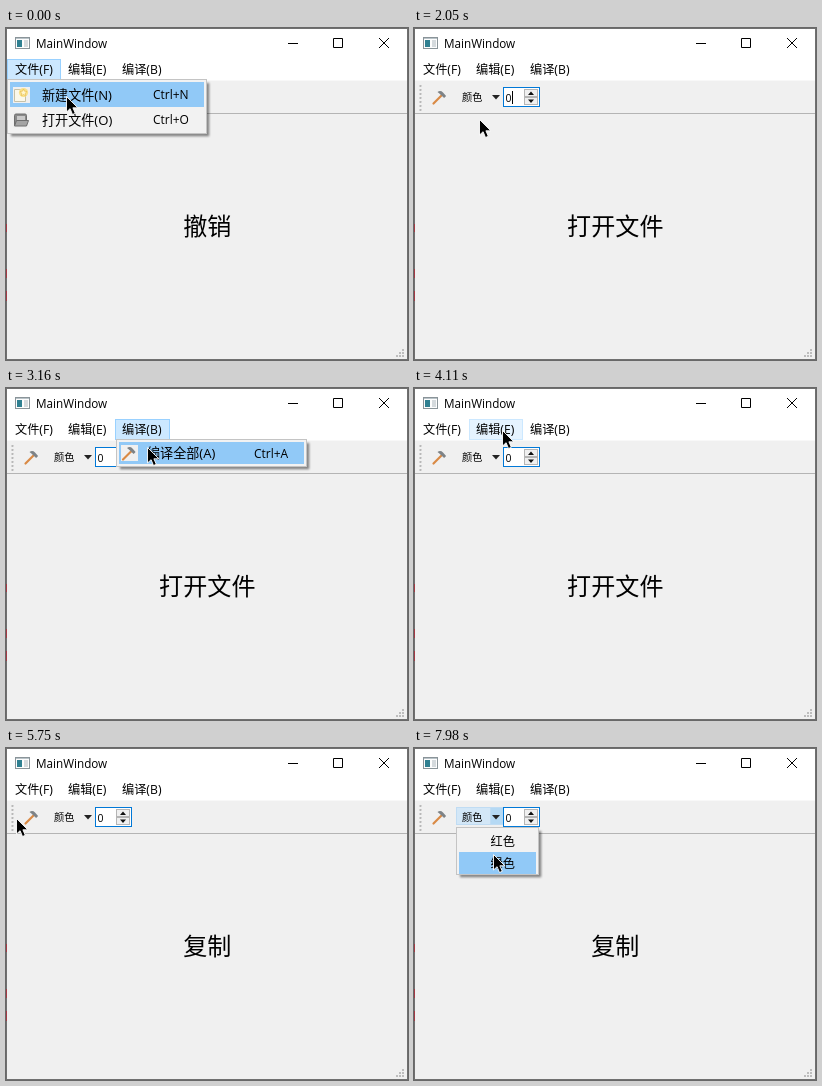
An HTML page that plays this animation: 402 px wide and 332 px high, repeating every 8 s.

```html
<!DOCTYPE html>
<html lang="zh-CN">
<head>
<meta charset="utf-8">
<title>MainWindow</title>
<style>
  html, body { margin: 0; width: 100%; height: 100%; overflow: hidden; background: #f0f0f0; }
  svg { display: block; width: 100vw; height: 100vh; }
  text { font-family: "Open Sans", "Noto Sans CJK SC", "Noto Sans CJK", sans-serif; fill: #000; white-space: pre; }
</style>
</head>
<body>
<svg id="stage" viewBox="0 0 402 332">
  <defs>
    <filter id="soft" x="-20%" y="-20%" width="140%" height="140%"><feGaussianBlur stdDeviation="1.1"/></filter>
    <g id="hammer">
      <path d="M2 14.5L10 6.5" stroke="#d98a45" stroke-width="2.2" stroke-linecap="round"/>
      <path d="M6 3Q9 1 11.500 3.500L14.600 7 12.600 9 9.500 6Q8 4.400 6 3z" fill="#7d8387"/>
    </g>
    <g id="new">
      <path d="M1.500 2.500h11v12h-11z" fill="#fbf8ea" stroke="#c6c1a8"/>
      <circle cx="10.500" cy="5.500" r="4.600" fill="#f8e08a"/>
      <path d="M10.500 2l1 2.200 2.500.3-1.800 1.700.5 2.500-2.200-1.200-2.200 1.200.5-2.500L7 4.500l2.500-.3z" fill="#fff6cf" stroke="#e8b944" stroke-width=".6"/>
    </g>
    <g id="open">
      <path d="M1.500 3.500q0-1.500 1.500-1.500h9q1.500 0 1.500 1.500v10h-12z" fill="#8a8a8a" stroke="#6e6e6e"/>
      <path d="M4 4h8v5H4z" fill="#c9c9c9"/>
      <path d="M3.500 8.500h12l-2 5.500h-12z" fill="#a4a4a4" stroke="#6e6e6e"/>
    </g>
    <g id="undo" fill="none" stroke="#858585" stroke-width="1.1">
      <path d="M6.500 3.500L4.500 5.500l2 2M4.500 5.500h5a2.700 2.700 0 0 1 0 5.400H6"/>
    </g>
    <g id="copy" fill="#f6f6f6" stroke="#6a6a6a" stroke-width=".9">
      <path d="M7 3.500h3.500l2 2v5H7z"/><path d="M4 5.500h3.500l2 2v5H4z"/>
    </g>
    <g id="paste" fill="#f2f2f2" stroke="#7a7a7a" stroke-width=".9">
      <path d="M4 4.500h6v7H4z"/><path d="M5.500 3.500h3v1.500h-3z"/><path d="M7.500 7.500h3l2 2v3h-5z"/>
    </g>
  </defs>
</svg>
<script>
const LOOP = 8000;
const svg = document.getElementById('stage');

function el(tag, attrs, parent = svg, text) {
  const node = document.createElementNS('http://www.w3.org/2000/svg', tag);
  for (const k in attrs) node.setAttribute(k, attrs[k]);
  if (text !== undefined) node.textContent = text;
  parent.appendChild(node);
  return node;
}
const rect = (x, y, width, height, fill, parent) => el('rect', { x, y, width, height, fill }, parent);
const box = (x, y, w, h, fill, stroke, parent) =>
  el('rect', { x: x + .5, y: y + .5, width: w - 1, height: h - 1, fill, stroke }, parent);
const path = (d, attrs, parent) => el('path', { d, fill: 'none', ...attrs }, parent);
const label = (s, x, y, size, parent) => el('text', { x, y, 'font-size': size }, parent, s);
const show = (node, on) => node.setAttribute('visibility', on ? 'visible' : 'hidden');

// Window frame
rect(0, 0, 402, 332, '#f0f0f0');
rect(0, 0, 402, 52, '#fff');
rect(1, 52, 400, 1, '#f8f8f8');
rect(1, 85, 400, 1, '#b4b4b4');
box(0, 0, 402, 332, 'none', '#707070');
for (const [y, h] of [[196, 8], [241, 9], [263, 10]]) rect(0, y, 1, h, '#a33a45');

// Title bar
box(9, 9, 15, 12, '#fdfdfd', '#8a9499');
rect(10, 10, 13, 1, '#b9c3c8');
rect(11, 12, 5, 7, '#2f8091');
rect(18, 12, 4, 7, '#d5dadd');
label('MainWindow', 30, 20, 11.7);
path('M282 15.5h10M327.500 10.500h9v9h-9zM373 10l10 10M383 10l-10 10', { stroke: '#000' });

// Menu bar
const bars = [['文件(F)', 1, 54, 9], ['编辑(E)', 55, 54, 62], ['编译(B)', 109, 55, 116]].map(([s, x, w, tx]) => {
  const hot = box(x, 31, w, 21, '#e5f3ff', '#cce8ff');
  label(s, tx, 46, 12.2);
  return { x, w, hot };
});

// Tool bar
for (let y = 57; y < 83; y += 4) { rect(7, y + 1, 1, 1, '#fff'); rect(5.500, y, 2, 2, '#b8b8b8'); }
const hammerHot = box(11, 54, 28, 30, '#d8eaf9', '#c0dcf3');
el('use', { href: '#hammer', x: 17.500, y: 61 });
const colorHot = el('g', {});
box(42, 59, 35, 18, '#d3e7f7', '#c0dcf3', colorHot);
const arrowHot = box(76, 59, 14, 18, '#d3e7f7', '#c0dcf3', colorHot);
label('颜色', 48, 73, 10.2);
path('M78 67h8l-4 4.500z', { fill: '#222' });

// Spin box
box(89, 59, 37, 20, '#fff', '#0078d7');
for (const y of [61, 69]) box(110, y, 14, 8, '#f0f0f0', '#b5b5b5');
path('M114 67l3-3.500 3 3.500zM114 71.500h6l-3 3.500z', { fill: '#111' });
label('0', 91.500, 73.500, 10.5);
const caret = rect(98, 63, 1, 13, '#000');

// Size grip
for (let r = 0; r < 3; r++)
  for (let c = 0; c <= r; c++) rect(396 - 3 * c, 321 + 3 * r, 2, 2, '#bdbdbd');

const message = el('text', { x: 201.300, y: 207, 'font-size': 24.1, 'text-anchor': 'middle' });

// L-shaped shadow, so that nothing dark shows through a fading menu
function shadow(x, y, w, h, parent) {
  const [r, b] = [x + w, y + h];
  path(`M${x + 4} ${b - 1.5}H${r - 1.5}V${y + 4}H${r + 2.2}V${b + 2.2}H${x + 4}z`,
    { fill: '#000', opacity: .46, filter: 'url(#soft)' }, parent);
}

// Popup menus; spans are [open, close], fade from the opening time
function popup({ x, y, w, h, row, first, icons, keys, tx, kx, ix, items, spans, bar, size = 13.1 }) {
  const g = el('g', {});
  shadow(x, y, w, h, g);
  const body = el('g', {}, g);
  box(x, y, w, h, '#f2f2f2', '#c4c4c4', body);
  const rows = items.map((s, i) => {
    const top = first + row * i, mid = top + row / 2;
    const hot = rect(x + 3, top, w - 6, row, '#91c9f7', body);
    if (icons) {
      const iy = Math.floor(mid - 7.5);
      rect(ix, iy, 17, 16, '#f0f0f0', body);
      el('use', { href: '#' + icons[i], x: ix, y: iy }, body);
    }
    label(s, tx, mid + 5.300, size, body);
    if (keys) label('Ctrl+' + keys[i], kx, mid + 4.500, 12, body);
    return { top, hot };
  });
  return { g, body, rows, x, w, row, spans, bar };
}
const popups = [
  popup({ x: 1, y: 51, w: 200, h: 55, row: 25, first: 54, icons: ['new', 'open'], keys: 'NO',
    tx: 36, kx: 147, ix: 7, items: ['新建文件(N)', '打开文件(O)'], spans: [[-500, 240], [1190, 1680]], bar: 0 }),
  popup({ x: 55, y: 51, w: 170, h: 80, row: 25, first: 54, icons: ['undo', 'copy', 'paste'], keys: 'ZCV',
    tx: 90, kx: 172, ix: 60, items: ['撤销(Z)', '复制', '粘贴'], spans: [[4170, 4780]], bar: 1 }),
  popup({ x: 110, y: 51, w: 191, h: 28, row: 22, first: 54, icons: ['hammer'], keys: 'A',
    tx: 141, kx: 248, ix: 115, items: ['编译全部(A)'], spans: [[2960, 3430]], bar: 2 }),
  popup({ x: 42, y: 79, w: 83, h: 48, row: 22, first: 82,
    tx: 76.500, items: ['红色', '绿色'], spans: [[7620, LOOP + 1]], bar: -1, size: 12.2 })
];

const cursor = path('M0 0V15.500L3.600 12.200 6 18 8.800 16.800 6.400 11.300H11.300z',
  { fill: '#000', stroke: '#fff', 'stroke-width': .9 });

// Pointer stops: time, x, y
const stops = [
  [0, 60, 68], [790, 60, 68], [1110, 43, 42], [1240, 43, 42], [1310, 43, 51], [1570, 67, 90],
  [1900, 67, 90], [2050, 65, 91], [2300, 66, 72], [2690, 86, 41], [2720, 88, 40], [2860, 118, 28],
  [2960, 128, 39], [3160, 141, 59], [3300, 146, 66], [3770, 146, 66], [4060, 89, 42], [4200, 86, 42],
  [4430, 100, 78], [4570, 106, 85], [4660, 107, 86], [4780, 107, 86], [5100, 70, 80], [5400, 18, 68],
  [5600, 6, 70], [5930, 14, 71], [6130, 14, 71], [6500, 45, 76], [6700, 64, 78], [6890, 72, 70],
  [7200, 72, 70], [7260, 76, 70], [7410, 76, 70], [7540, 79, 70], [7680, 79, 71], [7980, 79, 106], [LOOP, 79, 106]
];
const messages = [[0, '撤销'], [240, '新建文件'], [1750, '打开文件'], [4780, '复制']];
const focusTimes = [250, 1680, 3430, 4780];
const BLINK = 527;

function pointer(t) {
  const i = Math.max(1, stops.findIndex(s => s[0] > t));
  const [a, b] = [stops[i - 1], stops[i]];
  const p = (t - a[0]) / (b[0] - a[0]);
  return [1, 2].map(k => Math.round(a[k] + (b[k] - a[k]) * p));
}

function draw(t) {
  const [x, y] = pointer(t);
  const inside = (l, top, w, h) => x >= l && x < l + w && y >= top && y < top + h;
  cursor.setAttribute('transform', `translate(${x + .5} ${y + .5})`);

  let active = null;
  for (const m of popups) {
    const span = m.spans.find(([a, b]) => t >= a && t < b);
    show(m.g, span);
    for (const r of m.rows) show(r.hot, span && inside(m.x + 3, r.top, m.w - 6, m.row));
    if (!span) continue;
    active = m;
    m.body.setAttribute('opacity', Math.min(1, (t - span[0]) / 155));
  }

  bars.forEach((b, i) => {
    const open = active && active.bar === i;
    show(b.hot, open || (!active && inside(b.x, 31, b.w, 21)));
    b.hot.setAttribute('fill', open ? '#cce8ff' : '#e5f3ff');
    b.hot.setAttribute('stroke', open ? '#99d1ff' : '#cce8ff');
  });

  const live = !active && !(t >= 240 && t < 370);
  const dropped = active && active.bar < 0;
  show(hammerHot, live && inside(11, 54, 28, 30));
  const colorOn = dropped || (live && inside(42, 59, 48, 19));
  for (const n of colorHot.children) show(n, colorOn);
  arrowHot.setAttribute('fill', dropped ? '#b5d9f4' : '#d3e7f7');

  const focus = focusTimes.filter(f => f <= t).pop();
  show(caret, !active && focus !== undefined && Math.floor((t - focus) / BLINK) % 2 === 0);

  const text = messages.filter(m => m[0] <= t).pop()[1];
  if (message.textContent !== text) message.textContent = text;
}

const start = performance.now();
function tick() {
  draw((performance.now() - start) % LOOP);
  requestAnimationFrame(tick);
}
tick();
</script>
</body>
</html>
```
